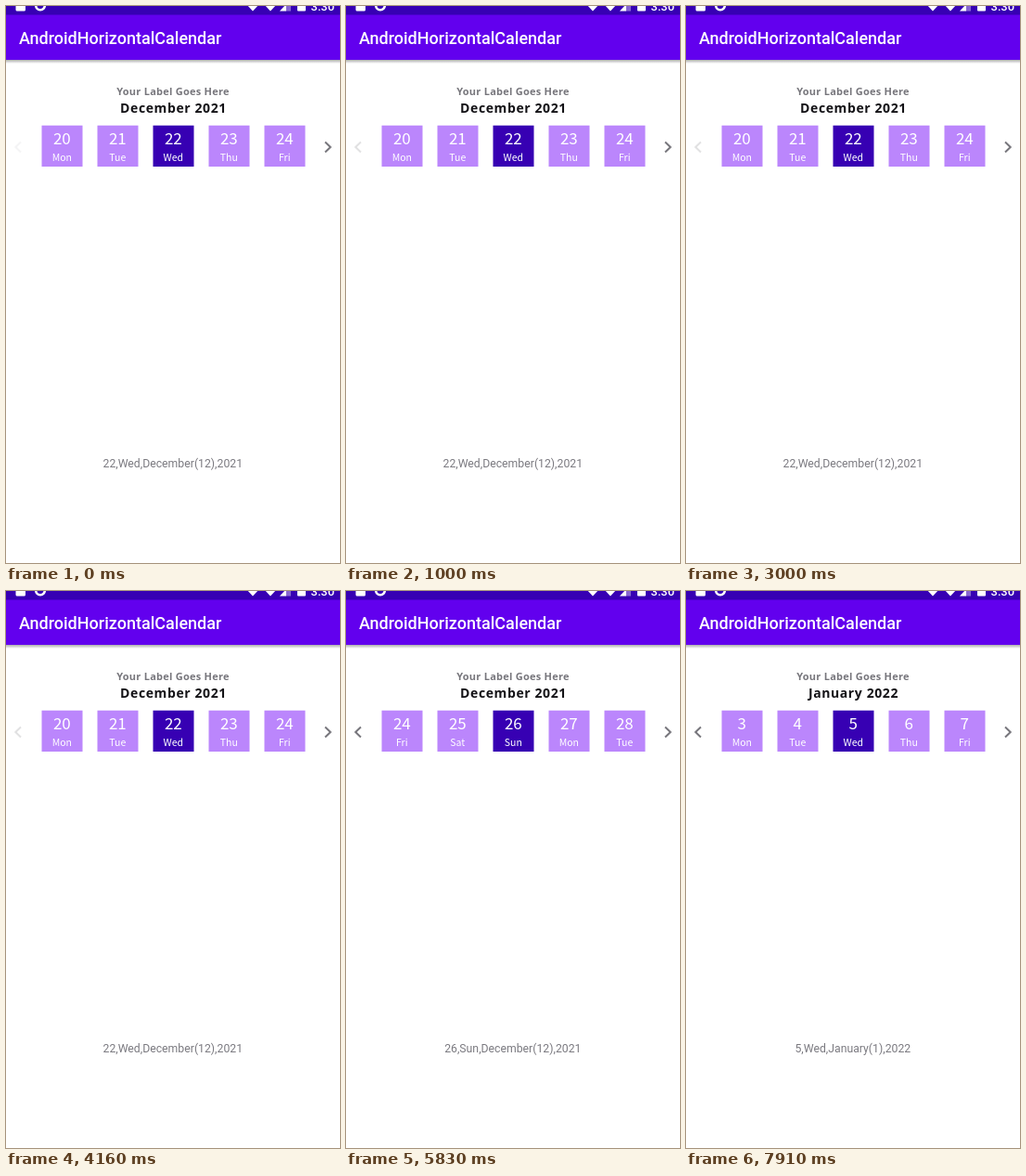
Recreate the animation shown at these times as an HTML page. Size 360 px wide and 600 px high, loop 8000 ms.

```html
<!DOCTYPE html>
<html lang="en">
<head>
<meta charset="utf-8">
<title>Horizontal calendar</title>
<style>
html, body { margin: 0; width: 100%; height: 100%; overflow: hidden; background: #fff; }
svg { display: block; width: 100%; height: 100%; }
text { font-family: Roboto, sans-serif; }
.mid { text-anchor: middle; }
.title { font-size: 18px; font-weight: 500; fill: #fff; }
.clock { font-size: 13px; font-weight: 500; fill: #fff; }
.label, .month { font-family: "Noto Sans", "Open Sans", sans-serif; font-weight: 700; }
.label { font-size: 11px; letter-spacing: .25px; fill: #77767c; }
.month { font-size: 14px; letter-spacing: .6px; fill: #141317; }
.picked { font-size: 12.25px; fill: #7b7a80; }
.cell rect { fill: #bb86fc; }
.cell.on rect { fill: #3700b3; }
.cell text { font-family: "Noto Sans CJK SC", "Noto Sans CJK JP", "Noto Sans", sans-serif; font-weight: 500; fill: #fff; }
.num { font-size: 17px; }
.day { font-size: 10.5px; }
.arrow { fill: none; stroke: #77767c; stroke-width: 2; }
</style>
</head>
<body>
<svg viewBox="0 0 360 600">
  <defs>
    <clipPath id="strip"><rect x="30.5" y="120" width="299" height="60"/></clipPath>
    <linearGradient id="shade" x2="0" y2="1">
      <stop stop-color="#000" stop-opacity=".32"/>
      <stop offset="1" stop-color="#000" stop-opacity="0"/>
    </linearGradient>
  </defs>
  <rect width="360" height="600" fill="#fff"/>
  <rect y="58" width="360" height="4" fill="url(#shade)"/>
  <rect y="9" width="360" height="49" fill="#6200ee"/>
  <rect width="360" height="9.5" fill="#3700b3"/>
  <g fill="#fff">
    <rect x="10.5" y="-6" width="10.5" height="11.5" rx="1.5"/>
    <circle cx="37" cy="-.5" r="4.8" fill="none" stroke="#fff" stroke-width="2.6"/>
    <path d="M259-2h14l-7 7.5zM278-2h14l-7 7.5z"/>
    <path d="M295 5.5L302-2V5.5z"/>
    <path d="M302-2L307-6V5.5H302z" opacity=".4"/>
    <rect x="314" y="-6" width="9" height="11.5" rx="1"/>
  </g>
  <text class="clock" x="328.5" y="4.5">3:30</text>
  <text class="title" x="14" y="41">AndroidHorizontalCalendar</text>
  <text class="label mid" x="180" y="96">Your Label Goes Here</text>
  <text class="month mid" id="month" x="180.5" y="115"></text>
  <g id="cells" clip-path="url(#strip)"></g>
  <path class="arrow" id="prev" d="M16 146.5L10.3 152L16 157.5"/>
  <path class="arrow" d="M344 146.5L349.7 152L344 157.5"/>
  <text class="picked mid" id="picked" x="179.8" y="497"></text>
</svg>
<script>
const LOOP = 8000, PITCH = 60, SLOTS = 7;
const DAYS = ["Sun", "Mon", "Tue", "Wed", "Thu", "Fri", "Sat"];
const MONTHS = { 0: "January", 11: "December" };

// [time in ms, days scrolled]: the strip moves in held steps
const SCROLL = [
  [0, 0],
  [5080, 1.6], [5330, 2.9], [5540, 3.4], [5710, 3.9], [5830, 4],
  [6080, 8.4], [6460, 13.79], [6750, 14]
];

const $ = id => document.getElementById(id);

function make(tag, parent, attrs) {
  const el = document.createElementNS("http://www.w3.org/2000/svg", tag);
  for (const key in attrs) el.setAttribute(key, attrs[key]);
  return parent.appendChild(el);
}

const cells = Array.from({ length: SLOTS }, () => {
  const box = make("g", $("cells"), { class: "cell" });
  make("rect", box, { x: -21.5, y: 128.7, width: 44, height: 44.3 });
  return {
    box,
    num: make("text", box, { class: "num mid", x: .3, y: 149 }),
    day: make("text", box, { class: "day mid", x: .3, y: 166.5 })
  };
});

const dateAt = i => new Date(2021, 11, 22 + i);

function draw(t) {
  const pos = SCROLL.filter(s => s[0] <= t).pop()[1];
  const chosen = Math.round(pos);

  cells.forEach((cell, k) => {
    const i = chosen + k - (SLOTS - 1) / 2;
    const date = dateAt(i);
    cell.box.setAttribute("transform", `translate(${180 + (i - pos) * PITCH} 0)`);
    cell.box.setAttribute("class", i === chosen ? "cell on" : "cell");
    cell.num.textContent = date.getDate();
    cell.day.textContent = DAYS[date.getDay()];
  });

  const date = dateAt(chosen), m = date.getMonth(), year = date.getFullYear();
  $("month").textContent = `${MONTHS[m]} ${year}`;
  $("picked").textContent = `${date.getDate()},${DAYS[date.getDay()]},${MONTHS[m]}(${m + 1}),${year}`;
  $("prev").style.opacity = pos > 0 ? 1 : t < 40 ? .08 : .22;
}

const start = performance.now();
function tick() {
  draw((performance.now() - start) % LOOP);
  requestAnimationFrame(tick);
}
tick();
</script>
</body>
</html>
```
